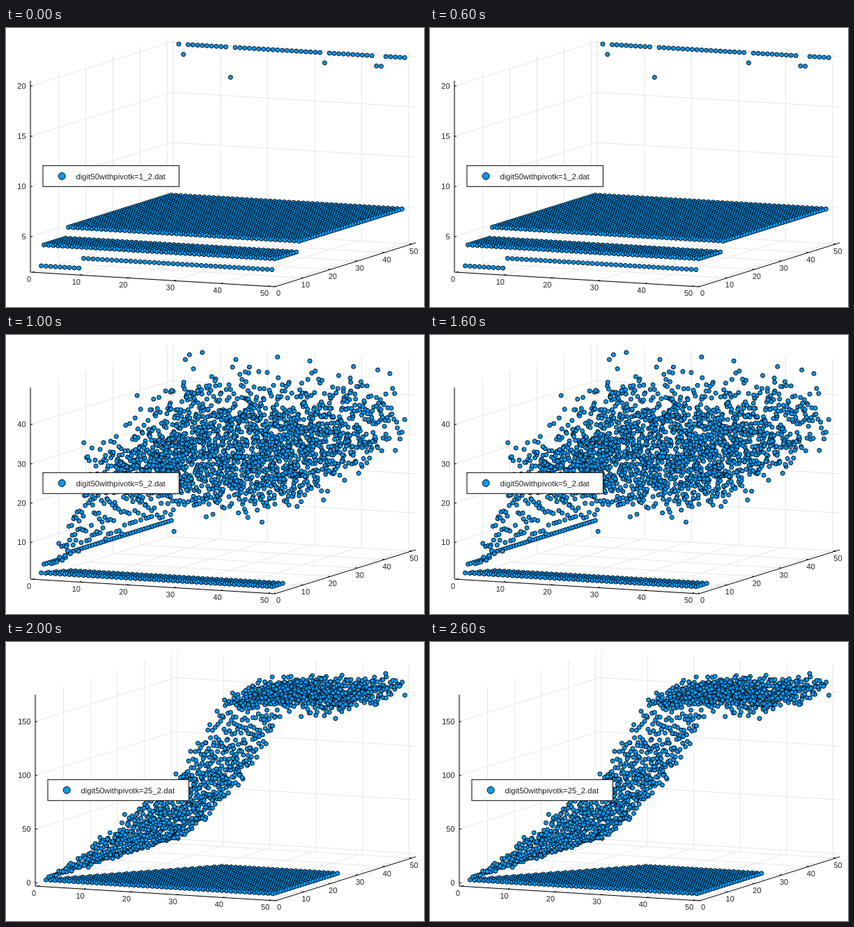
Animation, 600 px wide and 400 px high, one loop 3000 ms. Source, as an HTML page with a canvas:

```html
<!DOCTYPE html>
<html lang="en">
<head>
<meta charset="utf-8">
<title>Digit growth by pivot</title>
<style>
  html, body { margin: 0; width: 100%; height: 100%; overflow: hidden; background: #fff; }
  canvas { display: block; width: 600px; height: 400px; }
</style>
</head>
<body>
<canvas id="plot" width="600" height="400"></canvas>
<script>
const ctx = document.getElementById('plot').getContext('2d');
const N = 50, LO = -0.47, HI = 51.47, SPAN = HI - LO;
const FONT = '"Liberation Sans", Arial, sans-serif';
const BLUE = '#009afa', HOLD = 1000;

const scenes = [
  { pivot: 1, left: 35, corner: 386, zMin: 1.46, zMax: 20.54, ticks: [5, 10, 15, 20], box: [53, 195], value: flat },
  { pivot: 5, left: 35, corner: 386, zMin: 0.62, zMax: 49.38, ticks: [10, 20, 30, 40], box: [53, 195], value: spread },
  { pivot: 25, left: 42, corner: 387, zMin: -3.04, zMax: 175.04, ticks: [0, 50, 100, 150], box: [60, 202], value: ramp }
];

function random(seed) {
  return () => {
    seed = (seed + 0x6D2B79F5) | 0;
    let t = Math.imul(seed ^ (seed >>> 15), 1 | seed);
    t = (t + Math.imul(t ^ (t >>> 7), 61 | t)) ^ t;
    return ((t ^ (t >>> 14)) >>> 0) / 4294967296;
  };
}

// Digits of the untouched first column, shared by all scenes
function firstColumn(j) {
  return j === 1 || j === N ? 2 : j <= 10 ? 4 : 5;
}

function flat(i, j) {
  if (j === 1) return i < 10 ? 2 : 3;
  if (j < N) return j <= 10 ? 4 : 5;
  return i === 13 ? 17 : [3, 33, 44, 45].includes(i) ? 19 : 20;
}

// Skewed noise: a firm floor and a long upper tail
function spread(i, j, noise) {
  if (j <= 5 && i >= j) return 2;
  let rise = Math.min(1, 0.18 * i - 0.1);
  if (i <= 5) rise *= Math.min(1, (j + 5) / 14);
  const skewed = noise + 0.12 * (noise * noise - 1);
  const z = rise * (24 + 0.27 * (j - 6) + (3.5 + 0.035 * j) * skewed);
  return Math.min(48, Math.max(4, Math.round(z)));
}

function ramp(i, j, noise) {
  if (j <= 25 && i >= j) return 2;
  const mean = i < 25 ? 3 + 4.3 * i * (1 - Math.exp(-i / 4.5)) + 45 * (i / 25) ** 6 : 156;
  return Math.min(170, Math.round(mean + Math.min(4.5, 0.4 + 0.4 * i) * noise));
}

function projector({ left, corner, zMin, zMax }) {
  return (x, y, z) => {
    const u = (x - LO) / SPAN, v = (y - LO) / SPAN, w = (z - zMin) / (zMax - zMin);
    return [left + u * (corner - left) + v * (588 - corner), 350 + 21 * u - 63 * v - 274.5 * w];
  };
}

function line(color, ...pts) {
  ctx.strokeStyle = color;
  ctx.beginPath();
  pts.forEach(p => ctx.lineTo(...p));
  ctx.stroke();
}

function dot(x, y, r) {
  ctx.beginPath();
  ctx.arc(x, y, r, 0, 2 * Math.PI);
  ctx.fill();
  ctx.stroke();
}

function label(text, x, y, align, size = 11) {
  ctx.font = size + 'px ' + FONT;
  ctx.textAlign = align;
  ctx.fillStyle = '#222';
  ctx.fillText(text, x, y);
}

function drawAxes(s, at) {
  const { zMin, zMax } = s, grid = '#e4e4e4';
  ctx.lineWidth = 0.9;
  for (let t = 0; t <= 50; t += 10) {
    line(grid, at(t, LO, zMin), at(t, HI, zMin), at(t, HI, zMax));
    line(grid, at(HI, t, zMin), at(LO, t, zMin), at(LO, t, zMax));
  }
  s.ticks.forEach(z => line(grid, at(LO, LO, z), at(LO, HI, z), at(HI, HI, z)));

  ctx.lineWidth = 1;
  line('#000', at(LO, LO, zMax), at(LO, LO, zMin), at(HI, LO, zMin), at(HI, HI, zMin));
  for (let t = 0; t <= 50; t += 10) {
    const a = at(t, LO, zMin), b = at(HI, t, zMin);
    line('#000', a, at(t, LO + 0.7, zMin));
    line('#000', b, at(HI - 0.5, t, zMin));
    label(t, a[0] - 5, a[1] + 14, 'center');
    label(t, b[0] + 3.2, b[1] + 14, 'center');
  }
  s.ticks.forEach(z => {
    const [x, y] = at(LO, LO, z);
    line('#000', [x, y], [x + 3, y]);
    label(z, x - 6.5, y + 4, 'right');
  });
}

function drawPoints(s, at) {
  const rnd = random(s.pivot * 97 + 11);
  const normal = () => (rnd() + rnd() + rnd() + rnd() - 2) * 1.73;
  ctx.fillStyle = BLUE;
  ctx.strokeStyle = '#000';
  ctx.lineWidth = 0.95;
  for (let i = 1; i <= N; i++) {
    for (let j = 1; j <= N; j++) {
      const noise = normal();
      const z = i === 1 ? firstColumn(j) : s.value(i, j, noise);
      dot(...at(i, j, z), 3);
    }
  }
}

function drawLegend({ pivot, box: [x, w] }) {
  ctx.lineWidth = 1;
  ctx.fillStyle = '#fff';
  ctx.strokeStyle = '#000';
  ctx.fillRect(x, 197.3, w + 0.4, 30);
  ctx.strokeRect(x, 197.3, w + 0.4, 30);
  ctx.fillStyle = BLUE;
  dot(x + 27.2, 212.4, 5);
  label(`digit50withpivotk=${pivot}_2.dat`, x + 47.5, 216.5, 'left', 11.4);
}

function draw(s) {
  const at = projector(s);
  ctx.fillStyle = '#fff';
  ctx.fillRect(0, 0, 600, 400);
  drawAxes(s, at);
  drawPoints(s, at);
  drawLegend(s);
}

const start = performance.now();
let shown = -1;
function tick() {
  const k = Math.floor((performance.now() - start) / HOLD) % scenes.length;
  if (k !== shown) draw(scenes[shown = k]);
  requestAnimationFrame(tick);
}
tick();
</script>
</body>
</html>
```
